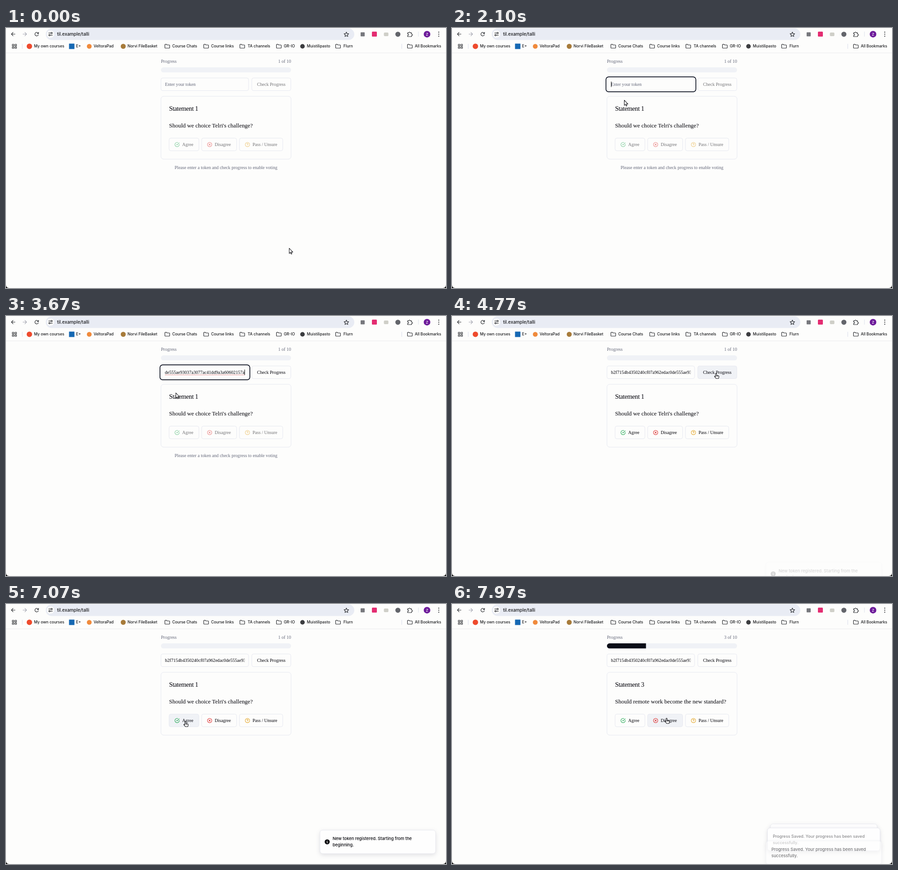
Write an HTML page that moves like this. It is 974 px wide and 575 px high and loops after 8 s.

```html
<!DOCTYPE html>
<html lang="en">
<head>
<meta charset="utf-8">
<title>Statement voting</title>
<style>
  html, body { margin: 0; width: 100%; height: 100%; overflow: hidden; background: #000; }
  svg { display: block; width: 100vw; height: 100vh; }
  text { white-space: pre; }
  .ui { font: 450 8.5px Inter, sans-serif; fill: #18191c; }
  .page { font: 10.08px "Liberation Serif", serif; fill: #000008; }
  .muted { fill: #64687a; }
  .icon { fill: none; stroke: #2b2d31; stroke-width: 1.2; stroke-linecap: round; stroke-linejoin: round; }
  .box { fill: #fdfdfc; stroke: #e6e8f0; }
  .list { font: 450 11.1px Inter, sans-serif; fill: #050507; }
  .small { font: 450 8px Inter, sans-serif; fill: #0c0c0e; }
  .toast { font: 500 9.3px Inter, sans-serif; fill: #05050a; }
  .toast .card { fill: #fefefe; stroke: #e8e9ef; filter: drop-shadow(0 3px 5px rgba(40, 40, 70, .13)); }
  #popup { filter: drop-shadow(0 3px 6px rgba(30, 30, 50, .3)); }
  .cursor { fill: #fff; stroke: #16161a; stroke-width: 1.1; stroke-linejoin: round; stroke-linecap: round; }
</style>
</head>
<body>
<svg id="stage" viewBox="0 0 974 575" preserveAspectRatio="none"></svg>
<script>
const LOOP = 8000;
const TOKEN = 'b2f7154b4350240cf07a962edac0de555ae93037a3077ac41dd9a3a60602157a';
const SITE = 'til.example/talli';
const ACCENT = '#f0f2f6';
const QUESTIONS = [
  "Should we choice Telri's challenge?",
  'Should we invest more in public transit?',
  'Should remote work become the new standard?'
];

const AT = { focus: 1000, popup: 2250, paste: 3230, blur: 4400, enable: 4620, vote1: 7350, vote2: 7800 };
const TOAST_AT = [4740, 7390, 7842];

// time, x, y of the pointer's hot spot
const POINTER = [
  [0, 627, 487], [60, 627, 487], [770, 440, 165], [960, 394, 120.5], [1700, 394, 120.5],
  [2200, 380, 164], [3200, 380, 164], [3470, 376, 170], [3900, 376, 170],
  [4300, 584, 126], [4750, 584, 126], [5500, 818, 570], [5650, 820, 574],
  [6330, 560, 350], [6500, 545, 335], [6950, 397, 260], [7420, 397, 260],
  [7700, 475, 253], [8000, 475, 253]
];
// time from which each pointer shape is used
const SHAPES = [[0, 'arrow'], [900, 'beam'], [1900, 'arrow'], [4200, 'hand'], [4850, 'arrow'], [6850, 'hand']];

const text = (x, y, s, cls, extra = '') =>
  `<text x="${x}" y="${y}" class="${cls}" ${extra}>${s.replace(/</g, '&lt;')}</text>`;
const rect = (x, y, w, h, r, extra) =>
  `<rect x="${x}" y="${y}" width="${w}" height="${h}" rx="${r}" ${extra}/>`;
const dot = (x, y, r, fill) => `<circle cx="${x}" cy="${y}" r="${r}" fill="${fill}"/>`;
const path = (d, x = 0, y = 0, extra = '') =>
  `<path class="icon" d="${d}" transform="translate(${x} ${y})" ${extra}/>`;

function toolbar() {
  const folder = x => path('M-5.3-3.2q0-1 1-1h2.6l1.3 1.4h4.7q1 0 1 1v5q0 1-1 1h-8.6q-1 0-1-1Z', x, 40.3);
  const link = (x, s) => text(x, 43.2, s, 'ui');
  const folders = [
    [357, 'Course Chats', 368], [443, 'Course links', 454], [523, 'TA channels', 535],
    [604, 'GR-IO', 615], [735, 'Flurn', 747], [894, 'All Bookmarks', 905]
  ];
  const cell = (x, y) => path('M0 0h3.4v3.4h-3.4Z', x, y);
  return rect(88, 1, 683, 25.5, 12.7, 'fill="#e9ecf4"')
    + path('M4 0H-4M-.3-3.8L-4 0l3.7 3.8', 16, 13.5)
    + path('M-4 0H4M.3-3.8L4 0 .3 3.8', 41.5, 13.5, 'style="stroke:#a3a5b0"')
    + path('M3.6 1.2A3.9 3.9 0 1 1 2.9-2.6L4-1.4M4-4.3v2.9H1.1', 68, 13.7)
    + dot(98.5, 13.5, 8, '#fdfdfd')
    + path('M-4-2.3H0M4-2.3h.2M-4 2.3h.2M0 2.3h4.2', 98.5, 13.5)
    + '<g class="icon"><circle cx="101" cy="11.2" r="1.5"/><circle cx="96.2" cy="15.8" r="1.5"/></g>'
    + text(113, 17, SITE, 'ui', 'style="font-size:9.9px"')
    + path('M0-5l1.5 3.3 3.6.4-2.7 2.4.8 3.6L0 2.9l-3.2 1.8.8-3.6-2.7-2.4 3.6-.4Z', 753.5, 14)
    + rect(785, 9.5, 9, 9, 1, 'fill="#77787d"')
    + rect(810, 8, 11, 11, 1.5, 'fill="#e42d72"')
    + rect(836.5, 10, 10, 8, 2, 'fill="#cfcfc8"')
    + dot(867.5, 13.8, 5.6, '#63656b')
    + path('M-4.5-3h2.4a1.7 1.7 0 1 1 3.4 0h2.9v3a1.6 1.6 0 1 1 0 3v2.3h-8.7V2.7a1.6 1.6 0 1 0 0-3Z', 893.5, 13.7)
    + rect(912.5, 8, 1, 11, 0, 'fill="#dcdfec"')
    + dot(932, 13.7, 7.3, '#6d1b9a')
    + text(932, 16.6, 'Z', 'ui', 'text-anchor="middle" style="fill:#fff;font-size:8px"')
    + [9.2, 13.7, 18.2].map(y => dot(958, y, 1.1, '#2b2d31')).join('')
    + cell(14, 36) + cell(19.8, 36) + cell(14, 41.6) + cell(19.8, 41.6)
    + rect(35.5, 35, 1, 11, 0, 'fill="#d8dbea"') + rect(875.5, 35, 1, 11, 0, 'fill="#d8dbea"')
    + dot(51.8, 40.5, 6, '#ee4a2d') + link(62, 'My own courses')
    + rect(139.5, 34.5, 12, 12, .5, 'fill="#1668b3"') + link(155, 'E+')
    + dot(184.3, 40.5, 5.3, '#f08a3c') + link(194, 'VeltoraPad')
    + dot(259.5, 40.5, 5.5, '#a77b3a') + link(269, 'Norvi FileBasket')
    + dot(656.3, 40.5, 5, '#3c3d40') + link(666, 'Muistilipasto')
    + folders.map(([x, s, tx]) => folder(x) + link(tx, s)).join('')
    + rect(0, 54.5, 974, 1, 0, 'fill="#ebecf0"');
}

function voteButton(id, x, w, tx, label, color, d) {
  return rect(x, 243.5, w, 28, 4, `class="box" id="${id}"`)
    + `<g class="fade"><path class="icon" d="${d}" style="stroke:${color};stroke-width:2.1"
        transform="translate(${tx - 17} 252) scale(.48)"/>${text(tx, 261.3, label, 'page')}</g>`;
}

function page() {
  const circle = 'M22 12A10 10 0 1 1 2 12 10 10 0 0 1 22 12Z';
  return text(343, 77.4, 'Progress', 'page muted')
    + text(631, 77.4, '', 'page muted', 'id="count" text-anchor="end"')
    + '<clipPath id="track"><rect x="343" y="87" width="288" height="11.5" rx="5.75"/></clipPath>'
    + '<g clip-path="url(#track)">' + rect(343, 87, 288, 11.5, 0, `fill="${ACCENT}"`)
    + rect(343, 87, 0, 11.5, 0, 'fill="#0a0d18" id="bar"') + '</g>'
    + rect(343, 110.5, 194, 28, 4, 'class="box"')
    + rect(340.8, 108.2, 199, 33, 6, 'id="ring" fill="#fdfdfc" stroke="#0a0f1e" stroke-width="1.7"')
    + text(352, 128, 'Enter your token', 'page muted', 'id="hint"')
    + '<clipPath id="field"><rect x="352" y="112" width="176.5" height="25"/></clipPath>'
    + `<g clip-path="url(#field)">${text(352, 128, TOKEN, 'page', 'id="token"')}</g>`
    + '<path id="spell" d="M352 130.4H528" stroke="#e26767" stroke-width="1.1" stroke-dasharray="1.4 1.2"/>'
    + rect(352, 118.5, 1, 12, 0, 'fill="#000" id="caret"')
    + rect(544, 110.5, 86.5, 28, 4, 'class="box" id="check"')
    + text(555.7, 128, 'Check Progress', 'page', 'id="checkLabel"')
    + rect(343, 151, 288, 139, 6, 'class="box"')
    + text(361, 183.4, '', 'page', 'id="title" style="font-size:14.4px;letter-spacing:-.025em"')
    + text(361, 220, '', 'page', 'id="question" style="font-size:12.96px"')
    + voteButton('agree', 361, 66, 390, 'Agree', '#16a34a', 'M22 11.1V12a10 10 0 1 1-5.9-9.1M9 11l3 3L22 4')
    + voteButton('disagree', 433, 77.5, 462, 'Disagree', '#dc2626', circle + 'M15 9l-6 6M9 9l6 6')
    + voteButton('pass', 516.7, 96, 545.7, 'Pass / Unsure', '#e2a01c',
      circle + 'M9.1 9a3 3 0 0 1 5.8 1c0 2-3 3-3 3M12 17h.01')
    + text(487, 312, 'Please enter a token and check progress to enable voting', 'page muted',
      'id="notice" text-anchor="middle"');
}

function popup() {
  const rows = [
    ['web', TOKEN.slice(0, 29) + '...'], ['web', `https://www.${SITE}`],
    ['web', 'Image: 1352x719 (14.8 MB)'], ['web', 'Image: 1351x720 (14.8 MB)'],
    ['web', 'https://lanternory-mossy.folio.test/'], ['web', 'hallo'],
    ['code', 'right: 0,...'], ['code', '<div...'], ['shell', '....'],
    ['files', 'index-DxMYSFKA.css'], ['script', 'return await serveFile(request, "dist/stati...'],
    ['files', 'index-DhKvvqcs.js'], ['files', 'app.js'], ['files', 'dist'], ['code', '.showVideo(true)']
  ];
  const tint = { code: '#1c7fd0', shell: '#141a18', files: '#2b93ee', script: '#c9c9cb' };
  const row = ([app, label], i) => {
    const y = 174 + i * 18;
    const mark = app === 'web' ? dot(246, y, 6, '#e2523f')
      : rect(240.5, y - 5.5, 11, 11, 2, `fill="${tint[app]}"`);
    const key = i > 0 && i < 9
      ? text(481, y + 4, '⌘' + (i + 1), 'list',
        `text-anchor="end" style="fill:#4c1158" opacity="${i < 6 ? 1 : .8 - (i - 6) * .25}"`) : '';
    return mark + text(258.7, y + 4, label, 'list', i ? '' : 'style="fill:#fff"') + key;
  };
  return '<g id="popup">' + rect(229, 130, 517, 311, 8, 'fill="#e8e8e8" stroke="#d0d0d6" stroke-width=".8"')
    + rect(235, 137, 504, 21, 4, 'fill="#d0d0d0"')
    + rect(235, 165, 252, 18, 3, 'fill="#55105f"')
    + rows.map(row).join('')
    + path('M3.5-3v1.7q0 2-2 2H-4M-1.6-1.6L-4 .7l2.4 2.3', 469.5, 174, 'style="stroke:#fff"')
    + text(491.8, 172.8, TOKEN.slice(0, 52), 'small') + text(491.8, 183.4, TOKEN.slice(52), 'small')
    + text(615, 419.4, '1 word; 64 chars', 'small', 'text-anchor="middle" style="font-size:7.8px"')
    + text(615, 430.8, 'Copied Today 9:22 AM', 'small', 'text-anchor="middle" style="font-size:7.7px"')
    + '</g>';
}

function toast(lines, info) {
  const x = info ? 28 : 12;
  const badge = dot(16, 26, 5.6, '#0a0a0e')
    + '<path d="M16 23.2v.1M15.2 25.5h.9v3.2" stroke="#fff" stroke-width="1.2" stroke-linecap="round" fill="none"/>';
  return '<g class="toast">' + rect(0, 0, 256, 52, 6, 'class="card"')
    + '<g>' + (info ? badge : '') + lines.map((s, i) => text(x, 22.3 + i * 14, s, '')).join('') + '</g></g>';
}

const saved = ['Progress Saved. Your progress has been saved', 'successfully.'];
const pointers = {
  arrow: 'M0 0V11.6L2.6 9.3 4.3 13.1 6 12.3 4.4 8.6H8Z',
  beam: 'M-3-6.5Q0-6.5 0-5V5Q0 6.5-3 6.5M3-6.5Q0-6.5 0-5M0 5Q0 6.5 3 6.5M-1.6 1.5H1.6',
  hand: 'M-1.2.8a1.2 1.2 0 0 1 2.4 0V4.3l3.8.8q1.7.5 1.4 2.4L5.5 11.2H.2L-3.4 7.2q-.4-1.4 1-1.2l1.2 1ZM1.2 4.3V6.2M3.2 4.8V6.4'
};

const stage = document.getElementById('stage');
stage.innerHTML = '<clipPath id="window"><path d="M0 0H974V568Q974 575 967 575H7Q0 575 0 568Z"/></clipPath>'
  + '<g clip-path="url(#window)">' + rect(0, 0, 974, 575, 0, 'fill="#fdfdfc"')
  + toolbar() + page() + popup()
  + toast(['New token registered. Starting from the', 'beginning.'], true) + toast(saved) + toast(saved)
  + '<path id="pointer" class="cursor"/></g>';

const el = Object.fromEntries([...stage.querySelectorAll('[id]')].map(n => [n.id, n]));
const toasts = [...stage.querySelectorAll('.toast')];
const faded = [...stage.querySelectorAll('.fade')];

const set = (node, attrs) => { for (const k in attrs) node.setAttribute(k, attrs[k]); };
const show = (node, on) => set(node, { visibility: on ? 'visible' : 'hidden' });
const hover = (node, on) => { node.style.fill = on ? ACCENT : ''; };
const clamp = v => Math.min(1, Math.max(0, v));
const easeOut = (t, start, length) => 1 - (1 - clamp((t - start) / length)) ** 2;

function pointerAt(t) {
  const i = Math.max(1, POINTER.findIndex(k => k[0] > t));
  const [t0, x0, y0] = POINTER[i - 1], [t1, x1, y1] = POINTER[i];
  const p = clamp((t - t0) / (t1 - t0)), e = p * p * (3 - 2 * p);
  return [x0 + (x1 - x0) * e, y0 + (y1 - y0) * e];
}

function render(t) {
  const step = t >= AT.vote2 ? 2 : t >= AT.vote1 ? 1 : 0;
  const focused = t >= AT.focus && t < AT.blur;
  const pasted = t >= AT.paste;
  const open = t >= AT.popup && t < AT.paste;
  const [x, y] = pointerAt(t);
  const over = (left, right, top, bottom) => x > left && x < right && y > top && y < bottom;

  el.count.textContent = `${step + 1} of 10`;
  el.title.textContent = `Statement ${step + 1}`;
  el.question.textContent = QUESTIONS[step];
  const filled = .2 * easeOut(t, AT.vote1, 150) + .1 * easeOut(t, AT.vote2, 150);
  set(el.bar, { width: 288 * filled });

  show(el.ring, focused);
  show(el.hint, !pasted);
  show(el.token, pasted);
  show(el.spell, pasted && focused);
  show(el.popup, open);
  show(el.notice, t < AT.enable);
  const blink = open || pasted || (t - AT.focus) % 1000 < 500;
  show(el.caret, focused && blink);
  set(el.caret, { x: pasted ? 527.8 : 352 });
  set(el.token, focused ? { x: 528, 'text-anchor': 'end' } : { x: 352, 'text-anchor': 'start' });

  set(el.checkLabel, { opacity: pasted ? 1 : .55 });
  faded.forEach(n => set(n, { opacity: t < AT.enable ? .55 : 1 }));
  hover(el.check, pasted && over(544, 631, 110, 139));
  hover(el.agree, t > AT.enable && over(361, 427, 243, 272));
  hover(el.disagree, t > AT.enable && over(433, 511, 243, 272));

  const entered = TOAST_AT.map(start => easeOut(t, start, 400));
  toasts.forEach((node, i) => {
    const depth = entered.slice(i + 1).reduce((a, b) => a + b, 0);
    const top = 500 - 10 * depth + 52 * (1 - entered[i]);
    set(node, {
      transform: `translate(823 ${top + 26}) scale(${1 - .05 * depth}) translate(-128 -26)`,
      opacity: entered[i]
    });
    set(node.lastChild, { opacity: clamp(1 - depth) });
  });

  const shape = SHAPES.filter(s => s[0] <= t).pop()[1];
  set(el.pointer, { d: pointers[shape], transform: `translate(${x} ${y})` });
  el.pointer.style.fill = shape === 'beam' ? 'none' : '';
}

const start = performance.now();
function tick() {
  render((performance.now() - start) % LOOP);
  requestAnimationFrame(tick);
}
tick();
</script>
</body>
</html>
```
